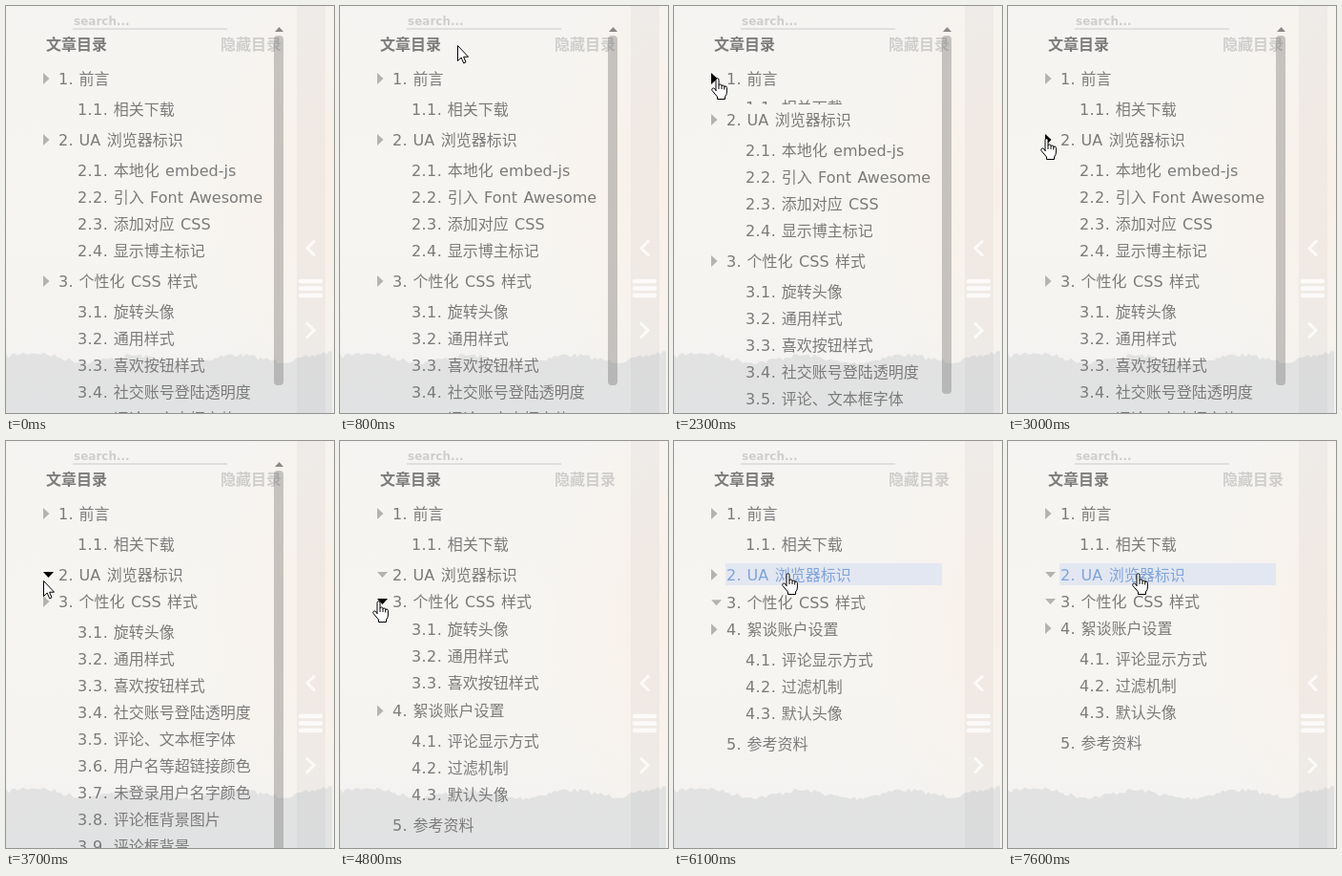
An HTML page that plays this animation: 344x426 px, repeating every 8000 ms.

```html
<!DOCTYPE html>
<html lang="zh-CN">
<head>
<meta charset="utf-8">
<title>文章目录</title>
<style>
html, body { margin: 0; width: 100%; height: 100%; overflow: hidden; }
body {
  position: relative;
  background: radial-gradient(140px 260px at 350px 190px, #f9f0e8, #f9f0e800),
    linear-gradient(#f5f4f2, #f7f5f1 55%, #f4f3f1 85%);
  color: #7b7b7a;
  font: 16px/28px "DejaVu Sans", "Noto Sans CJK SC", "Noto Sans CJK", sans-serif;
  white-space: nowrap;
}
#scene, #thumb, #up, #cursor, .abs { position: absolute; }
#scene { left: 0; top: 0; }
.abs { font-weight: bold; }
.pale { color: #cfcecc; }
#search { left: 71px; top: 2px; font-size: 12px; }
#line { left: 70px; top: 23px; width: 162px; height: 2px; background: #e0dfdd; }
#title { left: 42px; top: 27px; }
#hide { left: 225px; top: 27px; }
#toc { position: absolute; left: 54px; top: 62px; width: 227px; }
ul { list-style: none; margin: 0; padding: 0; }
.sub { overflow: hidden; padding-left: 20px; }
.row { position: relative; box-sizing: border-box; height: 28px; padding: 1px 0 0 1px; word-spacing: 1.4px; }
.row.on { color: #80a5da; background: linear-gradient(#e3e7f1, #e3e7f1) 0 2px / 100% 23px no-repeat; }
.num { letter-spacing: .4px; word-spacing: 0; }
.mark {
  position: absolute; left: -15px; top: 8px; width: 11px; height: 12px;
  background: #b4b3b2; clip-path: polygon(0 0, 6.5px 6px, 0 12px);
}
.mark.down { clip-path: polygon(0 3px, 11px 3px, 5.5px 9px); }
.mark.hot { background: #000; }
#thumb { left: 281px; top: 31px; width: 10px; border-radius: 4px; background: rgba(90, 90, 90, .32); }
#up { left: 282px; top: 22px; width: 9px; height: 5px; background: #8a8987; clip-path: polygon(50% 0, 100% 100%, 0 100%); }
#cursor { left: 0; top: 0; overflow: visible; }
</style>
</head>
<body>
<svg id="scene" width="344" height="426">
  <defs>
    <linearGradient id="fog" x1="0" y1="0" x2="0" y2="1">
      <stop offset="0" stop-color="#e2e2e2"/>
      <stop offset="1" stop-color="#e1e2e3"/>
    </linearGradient>
  </defs>
  <path id="trees" fill="url(#fog)"/>
  <rect x="305" width="30" height="426" opacity=".03"/>
  <g fill="none" stroke="#fff" stroke-width="3" opacity=".8">
    <path d="M324 245.5l-8 8 8 8M315 331.5l8 8-8 8"/>
    <path d="M309 288h21m-21 7.5h21m-21 7.5h21" stroke-width="4.5" stroke-linecap="round"/>
  </g>
</svg>
<div class="abs pale" id="search">search...</div>
<div class="abs" id="line"></div>
<div class="abs" id="title">文章目录</div>
<div class="abs pale" id="hide">隐藏目录</div>
<ul id="toc"></ul>
<div id="up"></div>
<div id="thumb"></div>
<svg id="cursor" width="20" height="24" fill="#fff" stroke="#000">
  <path id="arrow" d="M.5 .5v16l3.7-3.5 2.5 5.8 2.3-1-2.4-5.6h4.9z"/>
  <g id="hand" transform="translate(-6 0)" stroke-linejoin="round">
    <path d="M5 14V2.3q0-1.6 1.5-1.6t1.5 1.6v6q0-1.3 1.5-1.3t1.5 1.3V9q0-1 1.3-1t1.4 1.3v.7q0-1 1.3-1t1.4 1.5V15q0 3-1.9 5v2.5h-8V20L1 13.5q-.7-1.5.4-2.3t2.6.8l1 1.5"/>
    <path fill="none" d="M8 8.3V12m3-3v3m2.700-2v2.5"/>
  </g>
</svg>
<script>
const LOOP = 8000, TICK = 100, SLIDE = 100, ROW = 28, GAP = 4;

const sections = [
  { name: '前言', items: ['相关下载'], clicks: [1481, 2258] },
  { name: 'UA 浏览器标识', items: ['本地化 embed-js', '引入 Font Awesome', '添加对应 CSS', '显示博主标记'],
    clicks: [3150, 6099, 7500] },
  { name: '个性化 CSS 样式', items: ['旋转头像', '通用样式', '喜欢按钮样式', '社交账号登陆透明度', '评论、文本框字体',
    '用户名等超链接颜色', '未登录用户名字颜色', '评论框背景图片', '评论框背景', '评论按钮'], clicks: [4730] },
  { name: '絮谈账户设置', items: ['评论显示方式', '过滤机制', '默认头像'], clicks: [] },
  { name: '参考资料', items: [] }
];

// pointer moves: start, end, x and y reached
const entry = [225, -2];
const moves = [
  [400, 1100, 47, 74], [1200, 1300, 46, 74], [1800, 1900, 45, 75], [2400, 3000, 40, 138],
  [3600, 3700, 39, 146], [3700, 4400, 40, 167], [5100, 5300, 45, 153], [5300, 5700, 100, 142],
  [5800, 6000, 119, 138], [6200, 6700, 131, 138], [7000, 7100, 136, 138]
];

const $ = id => document.getElementById(id);
const clamp = v => Math.min(1, Math.max(0, v));
const show = (id, on) => { $(id).style.display = on ? '' : 'none'; };
const add = (parent, tag, cls, text = '') => {
  const el = parent.appendChild(document.createElement(tag));
  el.className = cls;
  el.textContent = text;
  return el;
};

function addRow(parent, num, text) {
  const row = add(parent, 'div', 'row');
  add(row, 'span', 'num', num + '. ');
  row.append(text);
  return row;
}

sections.forEach((s, i) => {
  const li = add($('toc'), 'li', '');
  s.row = addRow(li, i + 1, s.name);
  if (!s.items.length) return;
  s.mark = add(s.row, 'i', 'mark');
  s.sub = add(li, 'ul', 'sub');
  s.items.forEach((text, k) => addRow(s.sub, `${i + 1}.${k + 1}`, text));
});

function drawTrees() {
  let seed = 7, d = 'M0 426';
  for (let x = 0; x <= 344; x += 3) {
    seed = seed * 16807 % 2147483647;
    const hills = 366 - 4 * Math.cos((x - 30) * Math.PI * 2 / 105) + 4 * Math.sin(x * Math.PI / 344);
    d += `L${x} ${(hills + seed / 2147483647 * 5 - 2.5).toFixed(1)}`;
  }
  $('trees').setAttribute('d', d + 'V426Z');
}

function pointer(t) {
  let [x, y] = entry;
  for (const [from, to, toX, toY] of moves) {
    const k = clamp((t - from) / (to - from));
    x += (toX - x) * k;
    y += (toY - y) * k;
  }
  return [x, y];
}

function openness(clicks, t) {
  const past = clicks.filter(c => c < t);
  const down = past.length % 2 === 1;
  const k = past.length ? clamp((t - past[past.length - 1]) / SLIDE) : 1;
  return { down, share: down ? 1 - k : k };
}

function render(t) {
  const [x, y] = pointer(t);
  let top = 62, content = 861, hand = false;

  for (const s of sections) {
    const dy = Math.abs(y - top - ROW / 2);
    const over = x >= 54 && x <= 281 && dy < 12;
    s.row.classList.toggle('on', over);
    hand = hand || over;
    top += ROW;
    if (!s.sub) continue;

    const { down, share } = openness(s.clicks, t);
    const near = Math.abs(x - 44) < 6;
    s.mark.classList.toggle('down', down);
    s.mark.classList.toggle('hot', near && dy <= 7);
    hand = hand || near && dy < 6;

    const h = s.items.length * ROW, full = h + 2 * GAP;
    s.sub.style.height = h * share + 'px';
    s.sub.style.margin = GAP * share + 'px 0';
    top += full * share;
    content -= full * (1 - share);
  }

  // thumb length is inversely proportional to the content height
  const scrolls = content > 600;
  show('up', scrolls);
  show('thumb', scrolls);
  $('thumb').style.height = 366 * 861 / content + 'px';

  show('cursor', t >= moves[0][0]);
  show('hand', hand);
  show('arrow', !hand);
  $('cursor').style.transform = `translate(${Math.round(x)}px, ${Math.round(y)}px)`;
}

const start = performance.now();
function loop() {
  const t = (performance.now() - start) % LOOP;
  render(Math.floor(t / TICK) * TICK);
  requestAnimationFrame(loop);
}
drawTrees();
loop();
</script>
</body>
</html>
```
